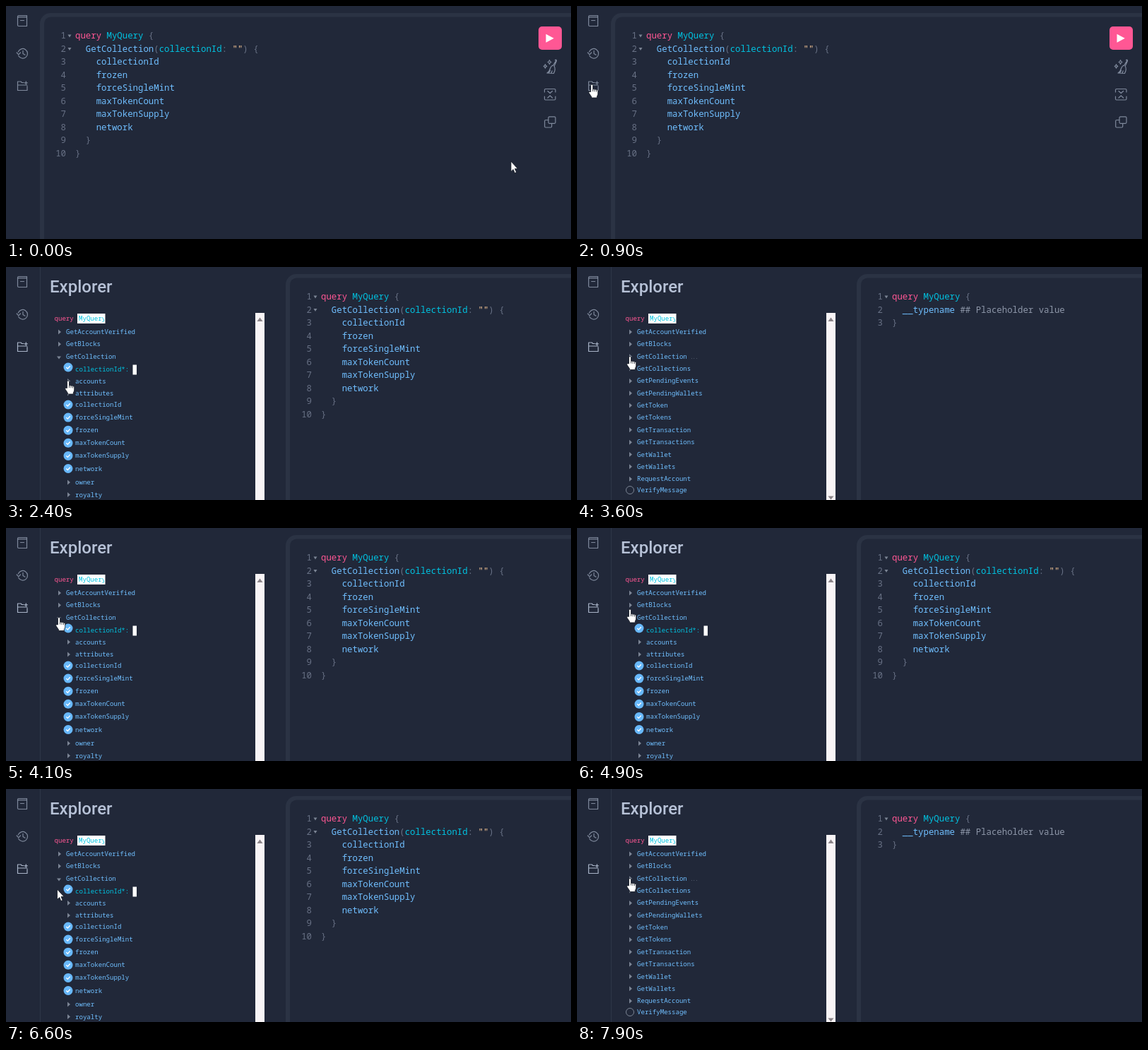
An HTML page that plays this animation: 800 by 330 pixels, repeating every 8000 ms.

```html
<!DOCTYPE html>
<html lang="en">
<head>
<meta charset="utf-8">
<title>Query explorer</title>
<style>
  html, body { margin: 0; width: 100%; height: 100%; overflow: hidden; background: #212839; }
  svg { display: block; width: 800px; height: 330px; }
  text { white-space: pre; }
  .code { font: 12.37px "Noto Sans Mono", "DejaVu Sans Mono", monospace; }
  .tree { font: 9.08px "Noto Sans Mono", "DejaVu Sans Mono", monospace; }
  .title { font: 500 24px Roboto, sans-serif; fill: #b7c2d7; }
  .key { fill: #ff5794; }
  .name { fill: #00c2e0; }
  .field { fill: #70bfff; }
  .punct { fill: #687185; }
  .str { fill: #ffcc99; }
  .note { fill: #8e97a9; }
  .mark { fill: #7b8494; }
  .icon { fill: none; stroke: #7f899c; stroke-width: 1.2; stroke-linecap: round; stroke-linejoin: round; }
</style>
</head>
<body>
<svg viewBox="0 0 800 330">
  <defs><clipPath id="nameBox"><rect x="101" y="66" width="38" height="14"/></clipPath></defs>
  <rect width="800" height="330" fill="#212839"/>

  <rect id="pressed" x="5" y="95" width="36" height="36" rx="4" fill="#2d3547"/>
  <g class="icon">
    <path d="M18 13.5H29.5V28.5H18a1.5 1.5 0 0 1-1.500-1.500V15a1.500 1.500 0 0 1 1.500-1.500zM16.500 17q0-1.300 1.500-1.300H29.500M20.500 20.500h5"/>
    <path d="M17.700 70.500A6.800 6.800 0 1 0 17.300 65M15.200 66l2.600 2.800 2.700-2.800M24 63.300V67.500l3 1.800"/>
    <path id="folder" d="M25 108.500H22.500L21 107H16.500V119.500H30V113.500M16.500 112H30M28.300 106.800v4M26.300 108.800h4"/>
  </g>

  <g id="explorer">
    <path d="M48.500 0V330" stroke="#2e3648"/>
    <text class="title" x="62" y="35.500">Explorer</text>
    <g class="tree">
      <text class="key" x="68.500" y="76">query</text>
      <rect x="101" y="66" width="39.500" height="14" fill="#fff"/>
      <text class="name" x="103" y="76" clip-path="url(#nameBox)">MyQuery</text>
      <g id="closedTree"></g>
      <g id="openTree"></g>
    </g>
    <rect x="353" y="65" width="13" height="265" fill="#f8f4f6"/>
    <path d="M355.500 77l4-5.500 4 5.500z" fill="#8a8488"/>
    <path id="scrollDown" d="M355.500 324.500l4 5 4-5z" fill="#8a8488"/>
  </g>

  <g id="editor">
    <path d="M48 330V25A15 15 0 0 1 63 10H800V330z" fill="#2b3344"/>
    <path d="M54 330V25A9.500 9.500 0 0 1 63.500 15.500H800V330z" fill="#212839"/>
    <g class="code">
      <g id="fullQuery"></g>
      <g id="emptyQuery"></g>
    </g>
    <rect x="754" y="29" width="33" height="33" rx="5" fill="#ff5794"/>
    <path d="M764.500 39.800l11.300 6-11.300 6z" fill="#fff"/>
    <g class="icon">
      <path d="M779 77l-4.500 7.500M777.500 76.500q2-1 2 1.300l-3.300 7.500q2.500 4-.7 10.200l-9.500-.5q3.500-2 4.500-6.500 1.500-4 4-4.500M768.500 95l2-3.500M772 95.300l1.200-3.500"/>
      <path d="M769.500 76.500q.4 2.500 2.500 3-2.100.5-2.500 3-.4-2.500-2.500-3 2.100-.5 2.500-3zM763.500 82.500q.4 2.300 2.300 2.800-1.900.5-2.300 2.800-.4-2.300-2.300-2.800 1.900-.5 2.300-2.800z"/>
      <path d="M762.500 122V119q0-1.500 1.500-1.500H776.500q1.500 0 1.500 1.500V122M762.500 128V131.500q0 1.500 1.500 1.500H776.500q1.500 0 1.500-1.500V128M767 120.500l3.300 3 3.300-3M767 130l3.300-3 3.300 3"/>
      <path d="M769.500 156.800h7q1.500 0 1.500 1.500v6.500q0 1.500-1.500 1.500h-7q-1.500 0-1.500-1.500v-6.500q0-1.500 1.500-1.500zM768 161.500h-3.800q-1.500 0-1.500 1.500v7.500q0 1.500 1.500 1.500h7q1.500 0 1.500-1.500v-4"/>
    </g>
  </g>

  <g id="cursor" fill="#fff" stroke="#141823" stroke-width=".8" stroke-linejoin="round">
    <path id="arrow" d="M0 0V14.500L3.200 11.500 5.400 16.600 7.700 15.600 5.500 10.600H9.600z"/>
    <g id="hand">
      <path d="M-1.500 10.500V1.500a1.500 1.500 0 0 1 3 0V7q1.600-1 2.500.4 1.600-1 2.500.5 1.700-.6 2.200 1V13q0 2-1.400 4v2H-.5v-1.500L-4.200 12q-.5-2 1.200-1.800z"/>
      <path d="M1.500 7v3M4 7.800v2.500M6.500 8.300v2.200" fill="none"/>
    </g>
  </g>
</svg>
<script>
const LOOP = 8000, STEP = 100, OPEN_AT = 1500, SHIFT = 348;
const TOGGLES = [3100, 4000, 7700];
const $ = id => document.getElementById(id);
const show = (id, on) => $(id).setAttribute('visibility', on ? 'inherit' : 'hidden');

// Each code line: indent, then alternating class and text.
const field = name => [4, 'field', name];
const header = [0, 'key', 'query ', 'name', 'MyQuery ', 'punct', '{'];
const fullQuery = [
  header,
  [2, 'field', 'GetCollection', 'punct', '(', 'name', 'collectionId', 'punct', ': ', 'str', '""', 'punct', ') {'],
  ...['collectionId', 'frozen', 'forceSingleMint', 'maxTokenCount', 'maxTokenSupply', 'network'].map(field),
  [2, 'punct', '}'],
  [0, 'punct', '}']
];
const emptyQuery = [header, [2, 'field', '__typename ', 'note', '## Placeholder value'], [0, 'punct', '}']];

function codeBlock(lines, folds) {
  return lines.map(([indent, ...parts], i) => {
    const y = 46 + i * 18.55;
    let spans = '';
    for (let k = 0; k < parts.length; k += 2) spans += `<tspan class="${parts[k]}">${parts[k + 1]}</tspan>`;
    const fold = i < folds ? `<path class="mark" d="M87.500 ${y - 5.5}h5l-2.500 4z"/>` : '';
    return `<text class="punct" x="85" y="${y}" text-anchor="end">${i + 1}</text>${fold}` +
      `<text x="${98 + indent * 7.42}" y="${y}">${spans}</text>`;
  }).join('');
}

const label = (x, y, text, cls = 'field') => `<text class="${cls}" x="${x}" y="${y + 3}">${text}</text>`;
const folded = (x, y, text) => `<path class="mark" d="M${x - 11} ${y - 3.5}l4 3.500-4 3.500z"/>` + label(x, y, text);
const tick = y => `<circle cx="88" cy="${y}" r="6.500" fill="#68b8fa"/>` +
  `<path d="M85.300 ${y}l2 2 3.500-3.800" fill="none" stroke="#fff" stroke-width="1.300"/>`;
const rowY = i => 92 + i * 17.35;

function closedTree() {
  const names = ['AccountVerified', 'Blocks', 'Collection', 'Collections', 'PendingEvents', 'PendingWallets',
    'Token', 'Tokens', 'Transaction', 'Transactions', 'Wallet', 'Wallets'].map(n => 'Get' + n);
  return [...names, 'RequestAccount'].map((n, i) => folded(85, rowY(i), n)).join('') +
    label(160.5, rowY(2), '…'.replace('…', '<tspan font-size="6">...</tspan>'), 'note') +
    '<circle cx="75" cy="316" r="5.500" fill="none" stroke="#7b8494"/>' + label(85, 316, 'VerifyMessage');
}

function openTree() {
  const picked = ['collectionId', 'forceSingleMint', 'frozen', 'maxTokenCount', 'maxTokenSupply', 'network'];
  return folded(85, rowY(0), 'GetAccountVerified') + folded(85, rowY(1), 'GetBlocks') +
    `<path class="mark" d="M72 126.500h6l-3 4z"/>` + label(85, rowY(2), 'GetCollection') +
    tick(142) + label(98, 145.3, 'collectionId*:', 'name') +
    '<rect x="179.500" y="138.500" width="5.500" height="14" fill="#fff"/>' +
    folded(98, 161.5, 'accounts') + folded(98, 179, 'attributes') +
    picked.map((n, i) => tick(195 + i * 18.1) + label(98, 195 + i * 18.1, n)).join('') +
    folded(98, 305, 'owner') + folded(98, 322.5, 'royalty');
}

$('fullQuery').innerHTML = codeBlock(fullQuery, 2);
$('emptyQuery').innerHTML = codeBlock(emptyQuery, 1);
$('closedTree').innerHTML = closedTree();
$('openTree').innerHTML = openTree();

// Pointer stops: time, x, y, shape kept until the next stop.
const stops = [
  [0, 715, 220, 'arrow'], [900, 21, 111, 'hand'], [1000, 20, 108, 'hand'],
  [1600, 20, 108, 'arrow'], [2200, 86, 159, 'hand'], [2400, 88, 161, 'hand'],
  [2900, 75, 128, 'hand'], [3600, 75, 126.5, 'hand'], [4600, 75, 126.5, 'hand'],
  [4900, 75, 115, 'hand'], [5600, 75, 118, 'arrow'], [6500, 72.5, 142, 'arrow'],
  [6600, 72.5, 142, 'arrow'], [7000, 158, 178, 'arrow'], [7400, 77, 130, 'arrow'],
  [7500, 75, 127, 'hand'], [LOOP, 75, 126.5, 'hand']
];

function pointer(t) {
  const i = stops.findIndex((s, k) => t >= s[0] && t < stops[k + 1][0]);
  const [t0, x0, y0, shape] = stops[i], [t1, x1, y1] = stops[i + 1];
  const u = (t - t0) / (t1 - t0), e = u * u * (3 - 2 * u);
  return { x: x0 + (x1 - x0) * e, y: y0 + (y1 - y0) * e, shape };
}

function render(ms) {
  const t = Math.floor((ms % LOOP) / STEP) * STEP;
  const opened = t >= OPEN_AT;
  const collapsed = TOGGLES.filter(at => t >= at).length % 2 === 1;
  show('explorer', opened);
  show('pressed', t >= 1300 && t < 1700);
  show('openTree', !collapsed);
  show('closedTree', collapsed);
  show('scrollDown', collapsed);
  show('fullQuery', !collapsed);
  show('emptyQuery', collapsed);
  $('folder').style.stroke = opened ? '#a9b4c8' : '';
  $('editor').setAttribute('transform', `translate(${opened ? SHIFT : 0} 0)`);
  const p = pointer(t);
  $('cursor').setAttribute('transform', `translate(${p.x} ${p.y})`);
  show('arrow', p.shape === 'arrow');
  show('hand', p.shape === 'hand');
}

const start = performance.now();
function tickFrame() {
  render(performance.now() - start);
  requestAnimationFrame(tickFrame);
}
tickFrame();
</script>
</body>
</html>
```
